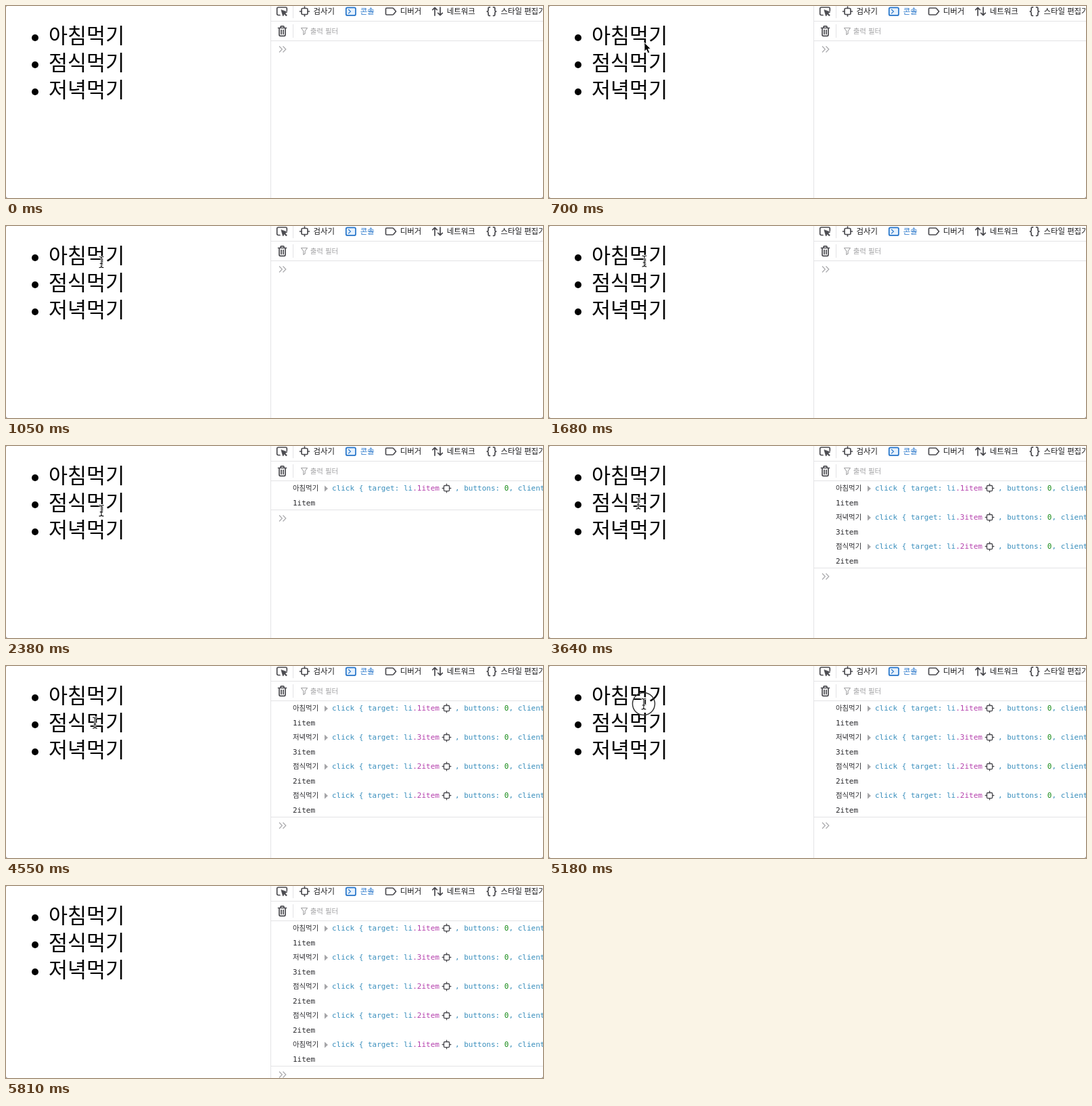
An HTML page for the animation above (5880 ms loop, 794 px wide and 284 px high).

```html
<!DOCTYPE html>
<html lang="ko">
<head>
<meta charset="utf-8">
<title>Click log</title>
<style>
html, body { margin: 0; width: 100%; height: 100%; overflow: hidden; background: #fff; }
svg { display: block; width: 794px; height: 284px; }
text { white-space: pre; font-family: "Noto Sans CJK KR", "Noto Sans CJK", "Noto Sans", sans-serif; }
.list { font-size: 30.5px; fill: #000; }
.tab { font-size: 11.4px; fill: #18181a; }
.hint { font-size: 10.5px; fill: #a4a4a6; }
.label { font-size: 10.4px; fill: #2a2a2e; }
.mono { font: 11px "DejaVu Sans Mono", "Liberation Mono", monospace; fill: #3a8fbd; }
.out { fill: #2a2a2e; }
.cls { fill: #b540ad; }
.num { fill: #168a16; }
.icon { fill: none; stroke: #4a4a4f; stroke-width: 1.7; stroke-linecap: round; stroke-linejoin: round; }
.line { stroke: #e3e3e5; }
</style>
</head>
<body>
<svg viewBox="0 0 794 284">
  <defs>
    <g id="node">
      <rect x="-4.5" y="-4.5" width="9" height="9" rx="1.5"/>
      <path d="M0-7v2M0 7v-2M-7 0h2M7 0h-2"/>
    </g>
  </defs>
  <rect width="794" height="284" fill="#fff"/>
  <g id="list"></g>

  <path class="line" d="M391.5 0V284M392 22.5H794M392 51.5H794M424.5 0V18M424.5 27V47"/>

  <g class="icon">
    <path d="M405 13.5h-2.5a1.8 1.8 0 0 1-1.8-1.8V3.8A1.8 1.8 0 0 1 402.5 2h11a1.8 1.8 0 0 1 1.8 1.8V7"/>
    <path d="M407 6l2.6 9 1.8-3.2 2.8 3 1.2-1.2-2.9-2.8 3-1.7z" fill="#4a4a4f" stroke-width=".8"/>
    <use href="#node" x="441.5" y="8"/>
    <g stroke="#2373c9">
      <rect x="502.8" y="2.3" width="14.2" height="11.6" rx="2" fill="#e4f0fd"/>
      <path d="M506.5 5.3l3 2.8-3 2.8" stroke-width="1.2"/>
    </g>
    <path d="M563 3h8.3q1 0 1.7.8l3.6 4.2-3.6 4.2q-.7.8-1.7.8H563q-1.5 0-1.5-1.5v-7Q561.500 3 563 3z"/>
    <path d="M634 14V2.500M630.700 5.700L634 2.400l3.300 3.300M642 2v11.600M638.700 10.400L642 13.700l3.300-3.300"/>
    <path d="M715.500 1.800h-.7q-1.700 0-1.700 1.700v2.700q0 1.600-1.800 1.900 1.800.3 1.800 1.900v2.600q0 1.700 1.700 1.700h.7M720.500 1.800h.7q1.700 0 1.700 1.700v2.700q0 1.600 1.800 1.900-1.800.3-1.800 1.900v2.600q0 1.700-1.700 1.700h-.7"/>
    <path d="M402.500 32.500h12M406 32v-1.200q0-1 1-1h3q1 0 1 1V32M404 33v9.500q0 1.800 1.800 1.800h5.400q1.800 0 1.800-1.800V33M407 35.500v6M410 35.500v6"/>
    <path d="M436.500 32.500h9l-3.300 4.500v3.700l-2.400 1.700V37z" stroke="#a4a4a6" stroke-width="1.100"/>
  </g>

  <g class="tab">
    <text x="454.500" y="11.500">검사기</text>
    <text x="523.700" y="11.500" fill="#2373c9" style="fill:#2373c9">콘솔</text>
    <text x="582.700" y="11.500">디버거</text>
    <text x="651.700" y="11.500">네트워크</text>
    <text x="731.500" y="11.500">스타일 편집기</text>
  </g>
  <text class="hint" x="449.700" y="41">출력 필터</text>

  <g id="log"></g>
  <g id="prompt">
    <path class="line" id="rule" d="M392 51.500H794"/>
    <path d="M404 59.500l4.300 4.500-4.300 4.500M409.500 59.500l4.300 4.500-4.300 4.500" fill="none" stroke="#a9a9ac" stroke-width="1.200"/>
  </g>

  <path d="M0 281v3h3q-3 0-3-3M794 281v3h-3q3 0 3-3M0 0h2q-2 0-2 2" fill="#8a8a8a"/>

  <g id="cursor">
    <circle id="ring" r="16.500" fill="none" stroke="#333" stroke-width="1.500"/>
    <path id="arrow" d="M0 0V13.200L3 10.600 5.200 15.800 7.800 14.700 5.600 9.600H9.500z" fill="#000" stroke="#fff" stroke-width=".9"/>
    <g id="beam" fill="none" stroke-linecap="round">
      <path id="stem" d="M-3-8Q0-8 0-6Q0-8 3-8M0-6V6M-3 8Q0 8 0 6Q0 8 3 8M-1.800 2H1.800" stroke="#fff" stroke-width="2.800"/>
      <use href="#stem" style="display:none"/>
      <path d="M-3-8Q0-8 0-6Q0-8 3-8M0-6V6M-3 8Q0 8 0 6Q0 8 3 8M-1.800 2H1.800" stroke="#111" stroke-width="1.100"/>
    </g>
  </g>
</svg>
<script>
const LOOP = 5880, STEP = 70, ROW = 43;
const meals = ["아침먹기", "점식먹기", "저녁먹기"];
const clicks = [
  { item: 1, down: 1610, up: 1680, log: 1820 },
  { item: 3, down: 2730, up: 2800, log: 2870 },
  { item: 2, down: 3430, up: 3570, log: 3570 },
  { item: 2, down: 4060, up: 4130, log: 4200 },
  { item: 1, down: 5180, up: 5250, log: 5320 }
];
// time, x, y of the pointer
const path = [
  [70, 776, 240], [630, 143, 56], [700, 141, 54], [840, 141, 62], [1120, 141, 52],
  [2100, 141, 52], [2590, 141, 124], [2980, 141, 124], [3290, 132, 85],
  [3850, 132, 85], [4000, 131.500, 84], [4550, 131.500, 84],
  [5040, 140, 56], [5350, 140, 56], [5740, 728, 221]
];

const $ = id => document.getElementById(id);
const show = (el, on) => el.setAttribute("visibility", on ? "visible" : "hidden");

$("list").innerHTML = meals.map((meal, i) =>
  `<circle cx="43" cy="${47 + 40 * i}" r="5"/>
   <text class="list" x="63" y="${54.500 + 40 * i}">${meal}</text>`).join("");

$("log").innerHTML = clicks.map(({ item }, i) =>
  `<g transform="translate(0 ${ROW * i})">
    <text class="label" x="424" y="66">${meals[item - 1]}</text>
    <path d="M471 58.500v9l5-4.500z" fill="#a5a5a8"/>
    <text class="mono" x="482" y="66">click { target: li<tspan class="cls">.${item}item</tspan></text>
    <use class="icon" style="stroke-width:1.500" href="#node" transform="translate(651.500 62.500) scale(.9)"/>
    <text class="mono" x="664" y="66">, buttons: <tspan class="num">0</tspan>, client</text>
    <text class="mono out" x="424" y="88">${item}item</text>
  </g>`).join("");
const entries = [...$("log").children];

function pointer(t) {
  const i = Math.max(1, path.findIndex(p => p[0] >= t));
  const [t0, x0, y0] = path[i - 1], [t1, x1, y1] = path[i];
  let k = (t - t0) / (t1 - t0);
  if (i === 1) k = 1 - (1 - k) ** 2;
  else if (i === path.length - 1) k = k * k;
  else k = k * k * (3 - 2 * k);
  return [x0 + (x1 - x0) * k, y0 + (y1 - y0) * k];
}

function draw(time) {
  const t = Math.floor(time % LOOP / STEP) * STEP;
  const count = clicks.filter(c => t >= c.log).length;
  entries.forEach((el, i) => show(el, i < count));
  $("prompt").setAttribute("transform", `translate(0 ${ROW * count})`);

  const inside = t >= 70 && t <= 5740;
  const isArrow = t < 770 || t > 5400;
  show($("arrow"), inside && isArrow);
  show($("beam"), inside && !isArrow);
  show($("ring"), clicks.some(c => t >= c.down && t < c.up));
  if (inside) $("cursor").setAttribute("transform", `translate(${pointer(t)})`);
}

const start = performance.now();
function tick() {
  draw(performance.now() - start);
  requestAnimationFrame(tick);
}
tick();
</script>
</body>
</html>
```
